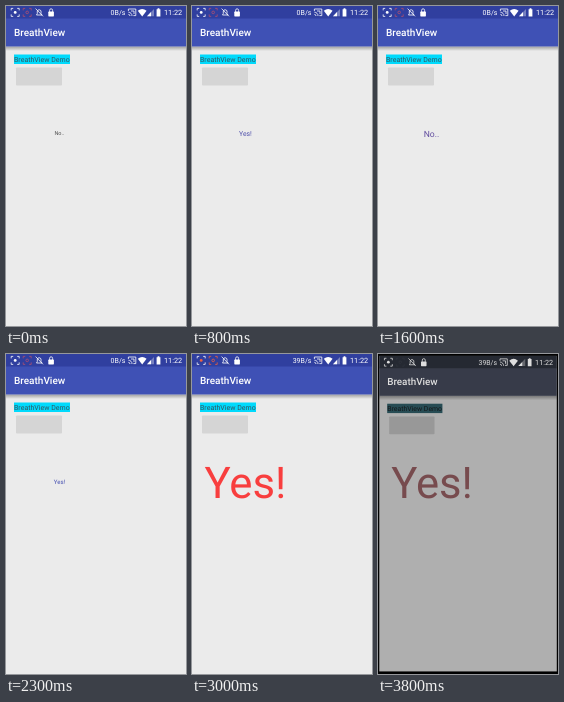
Write an HTML page that moves like this. It is 180x320 px and loops after 3.9 s.

```html
<!DOCTYPE html>
<html lang="en">
<head>
<meta charset="utf-8">
<title>Breathing text</title>
<style>
  html, body { margin: 0; width: 100%; height: 100%; overflow: hidden; background: #000; }
  svg {
    display: block; width: 100vw; height: 100vh;
    --bar: #303f9f; --tool: #3f51b5; --page: #ebebeb; --label: #00dafc;
    --ink: #345460; --button: #d5d5d5; --white: #fff; --alert: #b0506f;
  }
  svg.dim {
    --bar: #252932; --tool: #373b49; --page: #afafaf; --label: #274c54;
    --ink: #14191c; --button: #989898; --white: #dedede; --alert: #30333c;
  }
  svg.busy:not(.dim) { --alert: #f0603c; }
  text { font-family: Roboto, "Open Sans", sans-serif; text-rendering: geometricPrecision; }
  .white { fill: var(--white); }
  .line { fill: none; stroke: var(--white); stroke-width: .8; }
  .alert { fill: none; stroke: var(--alert); stroke-width: .8; }
</style>
</head>
<body>
<svg id="stage" viewBox="0 0 180 320">
  <defs>
    <linearGradient id="shade" x1="0" y1="0" x2="0" y2="1">
      <stop offset="0" stop-opacity=".32"/>
      <stop offset="1" stop-opacity="0"/>
    </linearGradient>
    <path id="corners" d="M-4 -2V-4H-2M2 -4H4V-2M4 2V4H2M-2 4H-4V2"/>
  </defs>
  <rect width="180" height="320" fill="#000"/>
  <g id="screen">
    <rect width="180" height="320" fill="var(--page)"/>
    <rect y="40.5" width="180" height="4.5" fill="url(#shade)"/>
    <rect y="12" width="180" height="28.5" fill="var(--tool)"/>
    <rect width="180" height="12.5" fill="var(--bar)"/>

    <g id="status">
      <g transform="translate(9.2 6.4)">
        <use href="#corners" class="line"/>
        <circle id="dot" r="1.4"/>
      </g>
      <g transform="translate(21.2 6.4)" class="alert">
        <use href="#corners"/>
        <circle r="1.3"/>
      </g>
      <path class="line" d="M30.5 9H36L35 7.5V5A2 2 0 0 0 31.3 5V7.5ZM29.6 2.6L37 10.3"/>
      <path class="line" d="M43.6 6V4.3A1.5 1.5 0 0 1 46.6 4.3V6"/>
      <rect class="white" x="42.3" y="5.6" width="5.6" height="4.8" rx=".6"/>
      <text id="speed" class="white" x="119.4" y="9" font-size="7" text-anchor="end"></text>
      <path class="line" d="M122.4 5V3H129.8V9.6H127.4M122.4 6.2A3.6 3.6 0 0 1 126 10M122.4 8.4A1.6 1.6 0 0 1 124 10M125 5H128V8"/>
      <path class="white" d="M131.8 4.8Q136.2 1.2 140.6 4.8L136.2 10.4Z"/>
      <path class="white" opacity=".35" d="M141 10.2L148 3V10.2Z"/>
      <path class="white" d="M141 10.2L145 6.1V10.2Z"/>
      <path class="white" d="M150.6 3.2H151.6V2.3H153.4V3.2H154.4V10.4H150.6Z"/>
      <text class="white" x="158" y="9.1" font-size="7.3">11:22</text>
    </g>

    <text class="white" x="8" y="30" font-size="10" font-weight="500">BreathView</text>
    <rect x="8" y="48.5" width="56" height="9.5" fill="var(--label)"/>
    <text x="8" y="55.8" font-size="7" fill="var(--ink)">BreathView Demo</text>
    <rect x="10" y="61.5" width="46" height="18" rx=".7" fill="var(--button)"/>
    <text id="word" x="53.4" text-anchor="middle"></text>
  </g>
</svg>
<script>
  const LOOP = 3900, START = 10, HALF = 380, CYCLE = 2 * HALF;
  const GROW = START + 3 * CYCLE, GROWN = 3010, BUSY = 2500, DIM = 3800;
  const SMALL = 5.5, MEDIUM = 22, LARGE = 44.2;
  const COOL = [63, 81, 181], WARM = [248, 62, 62];
  const get = id => document.getElementById(id);
  const stage = get("stage"), screen = get("screen"), word = get("word");
  const speed = get("speed"), dot = get("dot");
  const clamp = v => Math.max(0, Math.min(1, v));
  const mix = (a, b, k) => a + (b - a) * k;

  // Three breaths, then one long growth.
  function sizeAt(t) {
    if (t >= GROW) return mix(SMALL, LARGE, clamp((t - GROW) / (GROWN - GROW)));
    const phase = Math.max(0, t - START) % CYCLE / HALF;
    return mix(SMALL, MEDIUM, 1 - Math.abs(1 - phase));
  }

  function colorAt(t, size) {
    if (t >= DIM) return "#774b4e";
    if (t < START) return "#555";
    const k = clamp((size - SMALL) / (MEDIUM - SMALL));
    return `rgb(${COOL.map((c, i) => Math.round(mix(c, WARM[i], k)))})`;
  }

  function draw(t) {
    const size = sizeAt(t), busy = t >= BUSY, dim = t >= DIM;
    const breath = Math.floor(Math.max(0, t - START) / CYCLE);
    word.textContent = t >= GROW || breath % 2 ? "Yes!" : "No..";
    word.setAttribute("y", 127.2 + size * 0.385);
    word.setAttribute("font-size", size);
    word.setAttribute("fill", colorAt(t, size));
    speed.textContent = busy ? "39B/s" : "0B/s";
    dot.setAttribute("fill", busy && !dim ? "var(--alert)" : "var(--white)");
    stage.classList.toggle("busy", busy);
    stage.classList.toggle("dim", dim);
    screen.setAttribute("transform", dim ? "translate(1.3 1.9) scale(.986)" : "");
  }

  const begin = performance.now();
  function tick() {
    draw((performance.now() - begin) % LOOP);
    requestAnimationFrame(tick);
  }
  tick();
</script>
</body>
</html>
```
